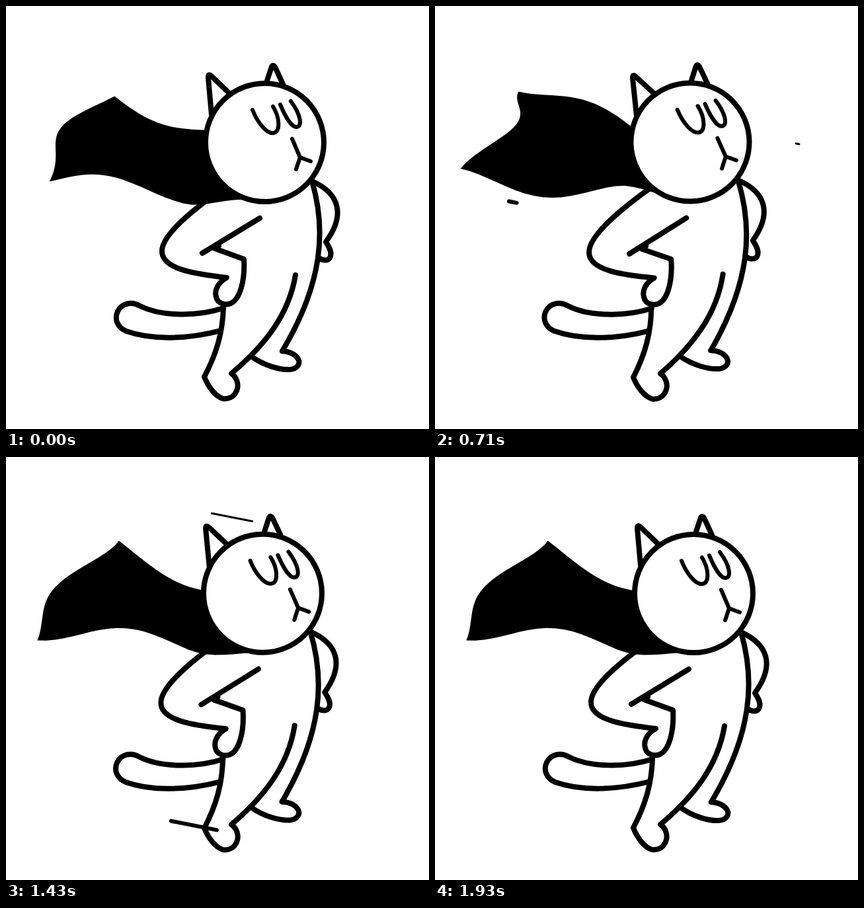
Write an HTML page that moves like this. It is 640 by 640 pixels and loops after 2000 ms.

```html
<!DOCTYPE html>
<html lang="en">
<head>
<meta charset="utf-8">
<title>Caped cat</title>
<style>
  html, body { margin: 0; height: 100%; overflow: hidden; background: #fff; }
  svg { display: block; width: 100%; height: 100%; }
  path, circle { fill: none; stroke: #000; stroke-width: 8; stroke-linecap: round; stroke-linejoin: round; }
  .face { stroke-width: 6; }
  .solid { fill: #fff; }
  #cape { fill: #000; stroke: none; }
</style>
</head>
<body>
<svg viewBox="0 0 640 640">
  <g id="far"></g>
  <g class="sway">
    <path id="tail" d="M329 457C290 470 235 470 203 454C190 446 175 450 169 462C163 475 170 487 182 492C222 506 275 504 325 491"/>
    <!-- left arm and hand -->
    <path d="M330 275C290 303 236 344 236 371C236 399 290 406 334 411C321 418 315 430 318 440C320 451 333 453 340 450C354 444 362 415 360 383L316 367L322 363M384 321L297 374"/>
    <!-- right side, arm and hand -->
    <path d="M463 265C485 340 479 420 418 522M463 265C505 284 514 316 484 357C490 366 494 374 490 381C487 386 479 385 475 382"/>
    <!-- legs and feet -->
    <path d="M438 407C428 468 390 515 341 556C349 561 353 573 349 582C345 592 336 595 328 594C316 590 306 576 300 561C318 527 328 495 329 455"/>
    <path d="M371 530C390 544 415 551 430 550C441 549 446 541 442 534C438 527 429 523 418 522"/>
  </g>
  <path id="cape"/>
  <g class="sway">
    <path class="solid" d="M311 164L306 108Q306 101 312 107L338 132"/>
    <path class="solid" d="M395 113L402 92Q404 88 407 92L419 118"/>
    <circle class="solid" cx="391.5" cy="206.5" r="89.5"/>
    <path class="face" d="M373 157C380 175 394 194 405 192C415 190 415 170 404 152"/>
    <path class="face" d="M415 149C422 166 432 184 440 183C449 182 446 164 431 144"/>
    <path class="face" d="M433 201L445 229L461 235M445 229L439 247"/>
  </g>
  <g id="near"></g>
</svg>
<script>
const FRAMES = 28, LOOP = 2000, FLAP = 7, TURN = 2 * Math.PI;
const $ = id => document.getElementById(id);
const mix = (a, b, u) => a + (b - a) * u;

// One wave runs along the top edge, the hem and the bottom edge of the cape.
function capePath(frame) {
  const wave = lag => Math.cos(TURN * frame / FLAP - lag);
  const top = x => 61 + 0.43 * x + 17 * wave(4.9 - 0.022 * x);
  const bottom = x => 257 + 0.1 * x + 16 * Math.min(1, (400 - x) / 120) * wave(6.3 - 0.022 * x);
  const hem = s => 148 - 122 * s + 22 * s * s + 23 * wave(0.7 + 4.8 * (1 - s) ** 1.5);
  const corner = hem(0), tip = hem(1);
  const edge = at => Array.from({ length: 25 }, (_, i) => at(i / 24).join(" "));
  const along = (from, to, y) => edge(u => [mix(from, to, u), y(mix(from, to, u))]);
  return "M" + [
    ...along(340, corner, top),
    ...edge(s => [hem(s), mix(top(corner), bottom(tip), s)]),
    ...along(tip, 370, bottom)
  ].join("L") + "Z";
}

// Wind streaks fly left along a shallow slope; the rear end follows the front.
const SLOPE = 0.198;
const easeOut = (u, power) => 1 - (1 - Math.min(1, Math.max(0, u))) ** power;
const nearMove = { length: 312, front: f => easeOut((f - 0.3) / 15, 4), rear: f => easeOut((f - 2.85) / 9.6, 2) };
const farMove = { length: 317, front: f => easeOut(f / 8.5, 1.3), rear: f => easeOut((f - 1.4) / 8.5, 1.3) };

function streak(layer, width, move, start, x, y) {
  const el = document.createElementNS("http://www.w3.org/2000/svg", "path");
  el.style.strokeWidth = width;
  $(layer).append(el);
  return frame => {
    const front = move.front(frame - start), rear = move.rear(frame - start);
    const point = p => `${x - p * move.length} ${y - p * move.length * SLOPE}`;
    el.setAttribute("d", front > 0 && rear < 1 ? `M${point(rear)}L${point(front)}` : "");
  };
}
const streaks = [
  streak("near", 6, nearMove, -0.3, 420, 356.5),
  streak("near", 6, nearMove, 12.9, 534, 607),
  streak("far", 3, farMove, 9.9, 551, 209),
  streak("far", 3, farMove, 16.8, 457, 114)
];

function draw(frame) {
  const lean = (1 - Math.cos(TURN * (frame + 1) / FRAMES)) / 2;
  for (const g of document.querySelectorAll(".sway"))
    g.setAttribute("transform", `rotate(${-lean} 360 560)`);
  $("tail").setAttribute("transform", `rotate(${1.3 * lean} 327 470)`);
  $("cape").setAttribute("d", capePath(frame));
  streaks.forEach(update => update(frame));
}

function tick() {
  const time = performance.now() % LOOP;
  draw(Math.floor((time + 4) * FRAMES / LOOP) % FRAMES);
  requestAnimationFrame(tick);
}
tick();
</script>
</body>
</html>
```
